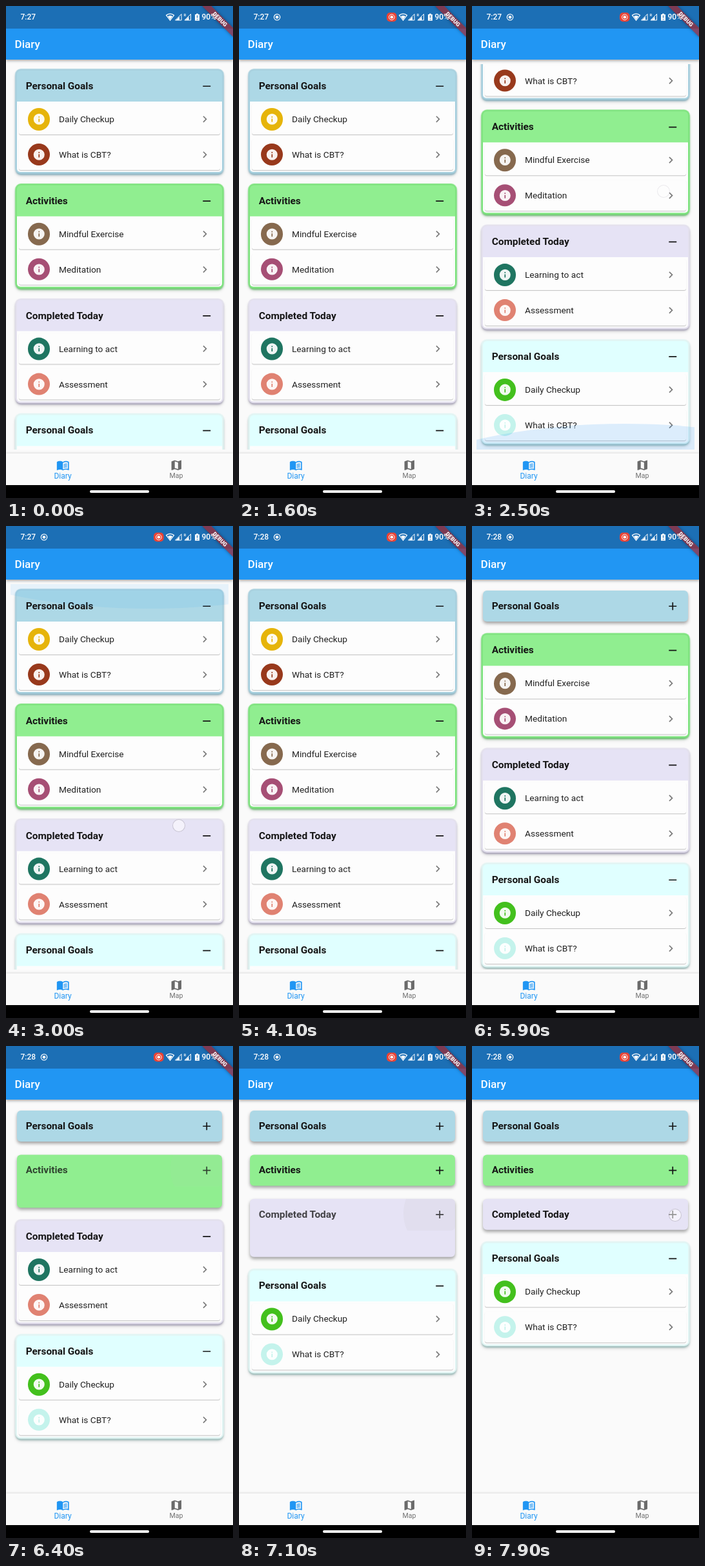
Animation, 352 px wide and 762 px high, one loop 8 s. Source, as an HTML page:

```html
<!DOCTYPE html>
<html lang="en">
<head>
<meta charset="utf-8">
<title>Diary</title>
<style>
  html, body { margin: 0; width: 100%; height: 100%; overflow: hidden; background: #fafafa; }
  body { position: relative; font-family: Roboto, sans-serif; color: #212121; }
  div, svg, span { position: absolute; box-sizing: border-box; }
  span { white-space: nowrap; }
  svg { overflow: visible; }

  #bar { left: 0; top: 0; width: 352px; height: 83px; background: linear-gradient(#1c6fb5 35px, #2196f3 35px); box-shadow: 0 2px 4px rgba(0,0,0,.32); }
  #bar span { left: 13.5px; top: 35px; color: #fff; font: 500 17.1px/48px Roboto, sans-serif; }
  #banner { left: 317.8px; top: 23.9px; width: 68.4px; height: 10.3px; background: rgba(183,28,28,.63); color: #fff; font: 900 8.7px/10.3px Roboto, sans-serif; text-align: center; transform-origin: 34.2px -23.9px; transform: rotate(45deg); box-shadow: 0 0 5px rgba(0,0,0,.35); }
  #status { left: 0; top: 0; width: 352px; height: 35px; color: #fff; font-weight: 500; font-size: 12px; line-height: 35px; }

  #view { left: 7px; top: 90px; width: 338px; height: 597px; overflow: hidden; }
  #list { left: -7px; top: -90px; width: 352px; }
  .card { left: 17px; top: 0; width: 318px; border-radius: 6px; }
  .head { left: 0; top: 0; width: 318px; height: 48.5px; overflow: hidden; border-radius: 6px; }
  .head span { left: 13.7px; font: 700 15.4px/48px Roboto, sans-serif; color: #151515; }
  .rows { left: 0; top: 48px; width: 318px; height: 109.4px; background: #fdfdfd; border-radius: 0 0 5px 5px; }
  .row { left: 3.4px; width: 311.2px; height: 48px; background: #fdfdfd; border-radius: 3px; box-shadow: 0 1px 1px rgba(0,0,0,.24); }
  .row span { left: 61.6px; font: 400 13.7px/48px Roboto, sans-serif; }
  .dot { left: 13.6px; top: 7px; width: 34.2px; height: 34.2px; border-radius: 50%; }
  .ripple { left: 238px; top: -41px; width: 126px; height: 126px; border-radius: 50%; background: rgba(190,190,190,.27); }
  .glow { left: 0; width: 1014px; height: 456px; border-radius: 50%; background: rgba(33,150,243,.15); }
  #touch { left: -10px; top: -10px; width: 20px; height: 20px; border-radius: 50%; background: rgba(255,255,255,.55); border: 1px solid rgba(90,80,110,.28); }

  #nav { left: 0; top: 693px; width: 352px; height: 49px; background: #fafafa; box-shadow: 0 -1px 3px rgba(0,0,0,.12); }
  #nav span { width: 80px; text-align: center; line-height: 14px; top: 28px; }
  #home { left: 0; top: 742px; width: 352px; height: 20px; background: #000; }
  #home div { left: 130px; top: 8.4px; width: 92px; height: 3.2px; border-radius: 2px; background: #fff; }
</style>
</head>
<body>
<div id="view"><div id="list"></div></div>
<div id="bar"><span>Diary</span></div>
<div id="banner">DEBUG</div>
<div id="status">
  <span id="clock" style="left:22.5px"></span>
  <svg width="352" height="35" fill="#fff">
    <g id="rec">
      <circle cx="59" cy="17.3" r="4.7" fill="none" stroke="#fff" stroke-width="1.2"/>
      <circle cx="59" cy="17.3" r="2.4"/>
      <rect x="229" y="10.3" width="15.5" height="14" rx="5" fill="#ea4335"/>
      <circle cx="236.8" cy="17.3" r="4.3" fill="none" stroke="#fff"/>
      <circle cx="236.8" cy="17.3" r="2.3"/>
    </g>
    <path d="M248.5 14.3Q254.5 9.8 260.5 14.3L254.5 22.3Z" fill="none" stroke="#fff" stroke-width="1.2"/>
    <path d="M251 16Q254.5 13.5 258 16L254.5 21Z"/>
    <path d="M272 12.5V22H262.5Z" fill="none" stroke="#fff"/>
    <path d="M269 16.5V22H263.5Z"/>
    <path d="M286.5 12.5V22H277Z" fill="none" stroke="#fff"/>
    <path d="M283.5 16.5V22H278Z"/>
    <text x="275.5" y="15.5" font-size="6">R</text>
    <path d="M293 13h2v-1.3h3V13h2v9.8h-7Z"/>
    <path d="M296.5 14.6v4M296.5 20v1.3" stroke="#1c6fb5" stroke-width="1.2"/>
  </svg>
  <span style="left:303.5px">90%</span>
</div>
<div id="nav">
  <span style="left:48px;font-size:12px;color:#2196f3">Diary</span>
  <span style="left:224px;font-size:10.5px;color:#707070">Map</span>
</div>
<div id="home"><div></div></div>
<div id="touch"></div>

<script>
const LOOP = 8000, STEP = 100;
const HEAD = 48, BODY = 109.4, GAP = 20.4, TOP = 100;
const FOLD_MS = 250;

const ICONS = {
  info: 'M12 2a10 10 0 1 0 0 20 10 10 0 0 0 0-20zm1 15h-2v-6h2v6zm0-8h-2V7h2v2z',
  next: 'M10 6L8.59 7.41 13.17 12l-4.58 4.59L10 18l6-6z',
  minus: 'M19 13H5v-2h14z',
  plus: 'M19 13h-6v6h-2v-6H5v-2h6V5h2v6h6z',
  map: 'M20.5 3l-.16.03L15 5.1 9 3 3.36 4.9c-.21.07-.36.25-.36.48V20.5c0 .28.22.5.5.5l.16-.03L9 18.9l6 2.1 5.64-1.9c.21-.07.36-.25.36-.48V3.5c0-.28-.22-.5-.5-.5zM15 19l-6-2.11V5l6 2.11z',
  book: 'M21 5c-1.11-.35-2.33-.5-3.5-.5-1.95 0-4.05.4-5.5 1.5-1.45-1.1-3.55-1.5-5.5-1.5S2.45 4.9 1 6v14.65c0 .25.25.5.5.5C3.1 20.45 5.05 20 6.5 20c1.95 0 4.05.4 5.5 1.5 1.35-.85 3.8-1.5 5.5-1.5 1.65 0 3.35.3 4.75 1.05.4.1.75-.2.75-.45V6c-.6-.45-1.25-.75-2-1zm0 13.5c-1.1-.35-2.3-.5-3.5-.5-1.7 0-4.15.65-5.5 1.5V8c1.35-.85 3.8-1.5 5.5-1.5 1.2 0 2.4.15 3.5.5zM13.5 10q3-1.5 6-.8v1.5q-3-.7-6 .8zM13.5 12.7q3-1.5 6-.8v1.5q-3-.7-6 .8zM13.5 15.4q3-1.5 6-.8v1.5q-3-.7-6 .8z'
};

const CARDS = [
  { title: 'Personal Goals', fill: '#add8e6', edge: '#a9d1df', shade: '#7ba9b9', foldAt: 5336,
    rows: [['Daily Checkup', '#e6b40a'], ['What is CBT?', '#98391c']] },
  { title: 'Activities', fill: '#90ee90', edge: '#80e480', shade: '#5cba62', foldAt: 6290,
    rows: [['Mindful Exercise', '#86694e'], ['Meditation', '#a64f75']] },
  { title: 'Completed Today', fill: '#e6e3f5', edge: '#e4e1ee', shade: '#9d98b0', foldAt: 7000,
    rows: [['Learning to act', '#1f7561'], ['Assessment', '#e08272']] },
  { title: 'Personal Goals', fill: '#e0ffff', edge: '#e2f5f4', shade: '#8cb3b0', foldAt: Infinity,
    rows: [['Daily Checkup', '#43c01d'], ['What is CBT?', '#c4f3ec']] }
];

const SCROLL = [[2000, 0], [2100, 18], [2200, 62], [2300, 100], [2400, 114.5], [2700, 114.5], [2800, 78], [2900, 22], [3000, 0]];
const GLOW_END = [[2300, 0], [2400, .8], [2500, 1], [2800, 0]];
const GLOW_START = [[2900, 0], [3000, .5], [3200, .4], [3700, 0]];

// Each touch: path of [time, x, y], then opacity over time.
const TOUCHES = [
  { path: [[2000, 304, 450], [2400, 297, 287]], alpha: [[1990, 0], [2000, 1], [2400, 1], [2500, .4], [2600, 0]] },
  { path: [[2700, 276, 270], [3000, 268, 464], [3100, 267, 484]], alpha: [[2650, 0], [2700, 1], [3100, 1], [3250, 0]] },
  { path: [[5300, 318, 122]], alpha: [[5250, 0], [5300, 1], [5400, .35], [5450, 0]] },
  { path: [[6200, 317, 192]], alpha: [[6150, 0], [6200, 1], [6300, .35], [6350, 0]] },
  { path: [[6900, 316, 261]], alpha: [[6850, 0], [6900, 1], [7000, .6], [7100, 0]] },
  { path: [[7900, 315, 262]], alpha: [[7850, 0], [7900, 1], [8000, 1]] }
];

const $ = id => document.getElementById(id);

function track(keys, t, col = 1) {
  if (t <= keys[0][0]) return keys[0][col];
  for (let i = 1; i < keys.length; i++) {
    const a = keys[i - 1], b = keys[i];
    if (t <= b[0]) return a[col] + (b[col] - a[col]) * (t - a[0]) / (b[0] - a[0]);
  }
  return keys[keys.length - 1][col];
}

const clamp = x => Math.min(1, Math.max(0, x));

// Solves cubic-bezier(.4, 0, .2, 1).
function ease(x) {
  let lo = 0, hi = 1;
  for (let i = 0; i < 20; i++) {
    const u = (lo + hi) / 2, v = 1 - u;
    if (1.2 * v * v * u + .6 * v * u * u + u ** 3 < x) lo = u; else hi = u;
  }
  return 3 * (1 - lo) * lo * lo + lo ** 3;
}

function add(parent, tag, cls, text = '') {
  const el = document.createElement(tag);
  el.className = cls;
  el.textContent = text;
  parent.append(el);
  return el;
}

function icon(parent, name, cx, cy, color) {
  const ns = 'http://www.w3.org/2000/svg', size = 20.5;
  const svg = document.createElementNS(ns, 'svg');
  const path = document.createElementNS(ns, 'path');
  svg.setAttribute('viewBox', '0 0 24 24');
  svg.style.cssText = `left:${cx - size / 2}px;top:${cy - size / 2}px;width:${size}px;height:${size}px`;
  path.setAttribute('d', ICONS[name]);
  path.setAttribute('fill', color);
  path.setAttribute('fill-rule', 'evenodd');
  svg.append(path);
  parent.append(svg);
  return path;
}

function buildCard(card) {
  card.el = add($('list'), 'div', 'card');
  card.el.style.background = card.fill;
  card.head = add(card.el, 'div', 'head');
  card.ripple = add(card.head, 'div', 'ripple');
  card.label = add(card.head, 'span', '', card.title);
  card.sign = icon(card.head, 'minus', 294.3, 24, '#151515');
  card.body = add(card.el, 'div', 'rows');
  card.rows.forEach(([text, color], i) => {
    const row = add(card.body, 'div', 'row');
    row.style.top = 3.4 + i * BODY / 2 + 'px';
    const dot = add(row, 'div', 'dot');
    dot.style.background = color;
    icon(dot, 'info', 17.1, 17.1, 'rgba(255,255,255,.93)');
    add(row, 'span', '', text);
    icon(row, 'next', 287.6, 24, '#7b7b7b');
  });
}

function drawCard(card, y, t) {
  const age = t - card.foldAt;
  const open = age < 0, moving = !open && age < FOLD_MS;
  const height = HEAD + BODY * (1 - ease(clamp(age / FOLD_MS)));
  const s = card.el.style;
  s.transform = `translateY(${y}px)`;
  s.height = height + 'px';
  s.boxShadow = open
    ? `0 0 1px 2.7px ${card.edge}, 0 2.5px 3px 2px ${card.shade}, 0 4px 6px 1px rgba(0,0,0,.2)`
    : '0 3px 5px rgba(0,0,0,.36)';
  card.body.style.display = open ? '' : 'none';
  card.sign.setAttribute('d', ICONS[open ? 'minus' : 'plus']);
  card.label.style.opacity = card.sign.style.opacity = moving ? .78 : 1;
  card.ripple.style.opacity = moving ? track([[80, 1], [120, 0]], age) : 0;
  return y + height + GAP;
}

function drawGlow(el, power, centre, atEnd) {
  const rise = 20 + 20 * power;
  el.style.opacity = Math.min(1, power * 1.2);
  el.style.left = centre - 507 + 'px';
  el.style.top = (atEnd ? 597 - rise : rise + 8 - 456) + 'px';
}

function draw(t) {
  $('clock').textContent = t < 3800 ? '7:27' : '7:28';
  $('rec').style.opacity = track([[0, 0], [100, .3], [400, 1]], t);

  let y = TOP - track(SCROLL, t);
  for (const card of CARDS) y = drawCard(card, y, t);

  drawGlow(endGlow, track(GLOW_END, t), 230, true);
  drawGlow(startGlow, track(GLOW_START, t), 215, false);

  const touch = TOUCHES.find(p => track(p.alpha, t) > 0);
  $('touch').style.opacity = touch ? track(touch.alpha, t) : 0;
  if (touch) $('touch').style.transform = `translate(${track(touch.path, t)}px, ${track(touch.path, t, 2)}px)`;
}

CARDS.forEach(buildCard);
const endGlow = add($('view'), 'div', 'glow');
const startGlow = add($('view'), 'div', 'glow');
icon($('nav'), 'book', 88, 18, '#2196f3');
icon($('nav'), 'map', 264, 18, '#6a6a6a');

const begin = performance.now();
function tick() {
  const t = (performance.now() - begin) % LOOP;
  draw(Math.floor(t / STEP) * STEP);
  requestAnimationFrame(tick);
}
tick();
</script>
</body>
</html>
```
